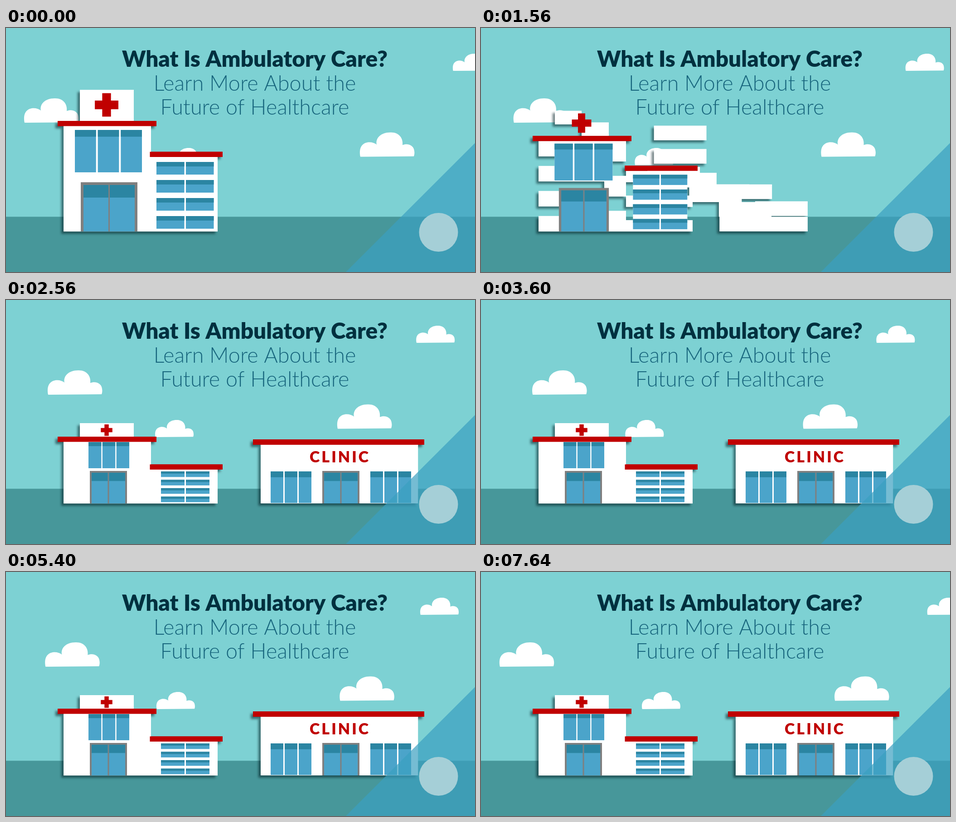
An HTML page with a canvas for the animation above (7680 ms loop, 1035 by 541 pixels).

```html
<!DOCTYPE html>
<html lang="en">
<head>
<meta charset="utf-8">
<title>Ambulatory care</title>
<style>
html, body { margin: 0; width: 1035px; height: 541px; overflow: hidden; background: #7dd1d3; }
canvas { display: block; }
</style>
</head>
<body>
<canvas id="stage" width="1035" height="541"></canvas>
<script>
const ctx = document.getElementById('stage').getContext('2d');
const LOOP = 7680, STEP = 40, GROUND = 451;
const RED = '#c00000', GLASS = '#4ba4ca', SHADE = '#2b85a2', FRAME = '#7f7f7f';
const cloudShape = new Path2D('M1 54C-2 39 1 25 17 22C25 21 32 23 37 27C34 13 46 0 67 0C86-1 96 13 94 28C106 23 119 29 120 41C121 46 120 50 119 53Z');

const lerp = (a, b, k) => a + (b - a) * k;
const ease = (t, start, dur) => {
  const u = Math.min(1, Math.max(0, (t - start) / dur));
  return u * u * (3 - 2 * u);
};

// Hospital blocks: tall and low extents
const sign = { x: 163, w: 119, top: [137, 273], bottom: [206, 303] };
const body = { x: 127, w: 193, top: [217, 314], bottom: [GROUND, GROUND] };
const wing = { x: 320, w: 147, top: [286, 376], bottom: [GROUND, GROUND] };
const clinic = { x: 562, y: 321, w: 347, h: 130, cols: 3, rows: 4 };

function box(x, y, w, h, color) {
  ctx.fillStyle = color;
  ctx.fillRect(x, y, w, h);
}

function pane(x, y, w, h, shade) {
  box(x, y, w, h, GLASS);
  box(x, y, w, Math.min(shade, h), SHADE);
}

function panes(x, y, w, h, gap, shade) {
  const pw = (w - 2 * gap) / 3;
  box(x, y, w, h, '#fff');
  for (let i = 0; i < 3; i++) pane(x + i * (pw + gap), y, pw, h, shade);
}

function door(cx, w, h) {
  const k = w / 125, f = 6 * k, top = GROUND - h;
  box(cx - w / 2, top, w, h, FRAME);
  const gw = (w - 2 * f - 3) / 2;
  for (const x of [cx - w / 2 + f, cx + 1.5]) pane(x, top + f, gw, Math.max(0, h - f), 28 * k);
}

function text(str, x, y, font, color, spacing = 0) {
  ctx.font = font + ' Lato, sans-serif';
  ctx.letterSpacing = spacing + 'px';
  ctx.textAlign = 'center';
  ctx.fillStyle = color;
  ctx.fillText(str, x, y);
}

// Drifts out until the middle of the loop and back again
function cloud(t, x, y, scale, drift) {
  ctx.save();
  ctx.translate(x + drift * (1 - Math.abs(2 * t / LOOP - 1)), y);
  ctx.scale(scale, scale);
  ctx.fillStyle = '#fff';
  ctx.fill(cloudShape);
  ctx.restore();
}

// Bricks leave the hospital bottom row first; far columns come from higher up
function addFlyingBricks(path, t) {
  const { cols, rows } = clinic, w = clinic.w / cols, h = clinic.h / rows;
  for (let col = 0; col < cols; col++) {
    for (let row = 0; row < rows; row++) {
      const up = rows - 1 - row, far = col / (cols - 1);
      const order = Math.min(3, Math.max(up, col, up + col - 1));
      const k = ease(t, 820 + 100 * order, 720 + 130 * order);
      const x = clinic.x + col * w, y = clinic.y + row * h;
      const fromX = sign.x + 157 * (1 - far) ** 2;
      const fromY = y - 160 * far ** 3 * Math.sqrt(up / 3);
      path.rect(lerp(fromX, x, k), lerp(fromY, y, k), w + 0.3, h);
    }
  }
}

// Evenly spread rows whose gaps close as the block sinks
function addRows(path, p, block, x, w, count, fromTop = block.top[0]) {
  const h = (block.bottom[1] - block.top[1]) / count;
  const spread = (block.bottom[0] - fromTop - h) / Math.max(1, count - 1);
  for (let i = 0; i < count; i++) {
    path.rect(x, lerp(fromTop + i * spread, block.top[1] + i * h, p), w, h + 0.3);
  }
}

// The solid wall opens from left to right, lower strips first
function addSolidWall(path, t, p, { x, w, top, bottom }) {
  const strips = 3, h = (bottom[0] - top[0]) / strips, lid = lerp(...top, p);
  for (let i = 0; i < strips; i++) {
    const y = top[0] + i * h, q = ease(t, 880 + (GROUND - y) * 0.9, 380);
    const from = Math.max(y, lid);
    if (q < 1 && from < y + h) path.rect(x + w * q, from, w * (1 - q), y + h - from);
  }
}

function wallPath(t, p) {
  const path = new Path2D();
  addFlyingBricks(path, t);
  addRows(path, p, sign, 163, 59, 1);
  addRows(path, p, sign, 222, 60, 1, 176);
  addRows(path, p, body, 127, 148, 4);
  addRows(path, p, body, 272, 48, 3);
  addRows(path, p, wing, 320, 147, 3);
  for (const block of [sign, body, wing]) addSolidWall(path, t, p, block);
  return path;
}

function roofPath(t, p) {
  const path = new Path2D();
  path.rect(114, lerp(...body.top, p) - 11, 218, 11.5);
  path.rect(317.5, lerp(...wing.top, p) - 11.5, 160.5, 11.5);
  const span = 378 * ease(t, 2060, 260);
  path.rect(734 - span / 2, 309, span, 12);
  return path;
}

function drawHospital(p) {
  panes(lerp(152, 182, p), lerp(226, 315, p), lerp(148, 90, p), lerp(94, 58, p), lerp(4, 2.5, p), lerp(15, 9, p));
  door(lerp(227.5, 226, p), lerp(125, 82, p), lerp(109, 72, p));

  const x = lerp(332, 342, p), w = lerp(61.5, 52, p), h = lerp(28, 12.5, p);
  const top = lerp(297, 380, p), pitch = lerp(40, 18.6, p);
  box(x, top, 2 * w + 3.5, GROUND - top, '#fff');
  for (let i = 0; i < 4; i++) {
    for (const left of [x, 397]) pane(left, top + i * pitch, w, h, lerp(10, 5, p));
  }

  const cy = lerp(170.5, 288.5, p), size = lerp(52, 25.5, p), arm = size * 0.37;
  box(222 - size / 2, cy - arm / 2, size, arm, RED);
  box(222 - arm / 2, cy - size / 2, arm, size, RED);
}

function drawClinic(t) {
  const grow = ease(t, 2200, 300), h = 70 * grow;
  if (!grow) return;
  for (const x of [584, 804]) panes(x, 450 - h, 90, h, 3, 13 * grow);
  door(739, 82, 72 * grow);
  ctx.globalAlpha = grow;
  text('CLINIC', 737, 360, '900 34px', RED, 4);
  ctx.globalAlpha = 1;
}

function drawCorner() {
  ctx.fillStyle = 'rgba(59,160,193,.7)';
  ctx.fill(new Path2D('M1035 255V541H750Z'));
  ctx.fillStyle = '#a5cfd7';
  ctx.beginPath();
  ctx.arc(954.5, 453, 43, 0, 2 * Math.PI);
  ctx.fill();
}

function draw(t) {
  box(0, 0, 1035, 541, '#7dd1d3');
  box(0, 418.5, 1035, 122.5, '#47979a');
  cloud(t, 40, 156, 1, 78);
  cloud(t, 781, 231.5, 1, -75);
  cloud(t, 355.5, 266, 0.705, -39.5);
  cloud(t, 986, 57, 0.705, -121);

  const p = ease(t, 1120, 1120), roofs = roofPath(t, p);
  ctx.save();
  ctx.shadowColor = 'rgba(0,30,35,.55)';
  ctx.shadowBlur = 5;
  ctx.shadowOffsetX = -5;
  ctx.shadowOffsetY = 5;
  ctx.fillStyle = RED;
  ctx.fill(roofs);
  ctx.fillStyle = '#fff';
  ctx.fill(wallPath(t, p));
  ctx.restore();

  drawHospital(p);
  drawClinic(t);
  ctx.fillStyle = RED;
  ctx.fill(roofs);
  drawCorner();

  text('What Is Ambulatory Care?', 549, 86, '900 49.5px', '#00303f');
  text('Learn More About the', 549, 139, '300 46.8px', '#16647c');
  text('Future of Healthcare', 549, 192, '300 46.8px', '#16647c');
}

const begin = performance.now();
function tick() {
  const t = (performance.now() - begin) % LOOP;
  draw(Math.floor(t / STEP) * STEP);
  requestAnimationFrame(tick);
}
tick();
</script>
</body>
</html>
```
